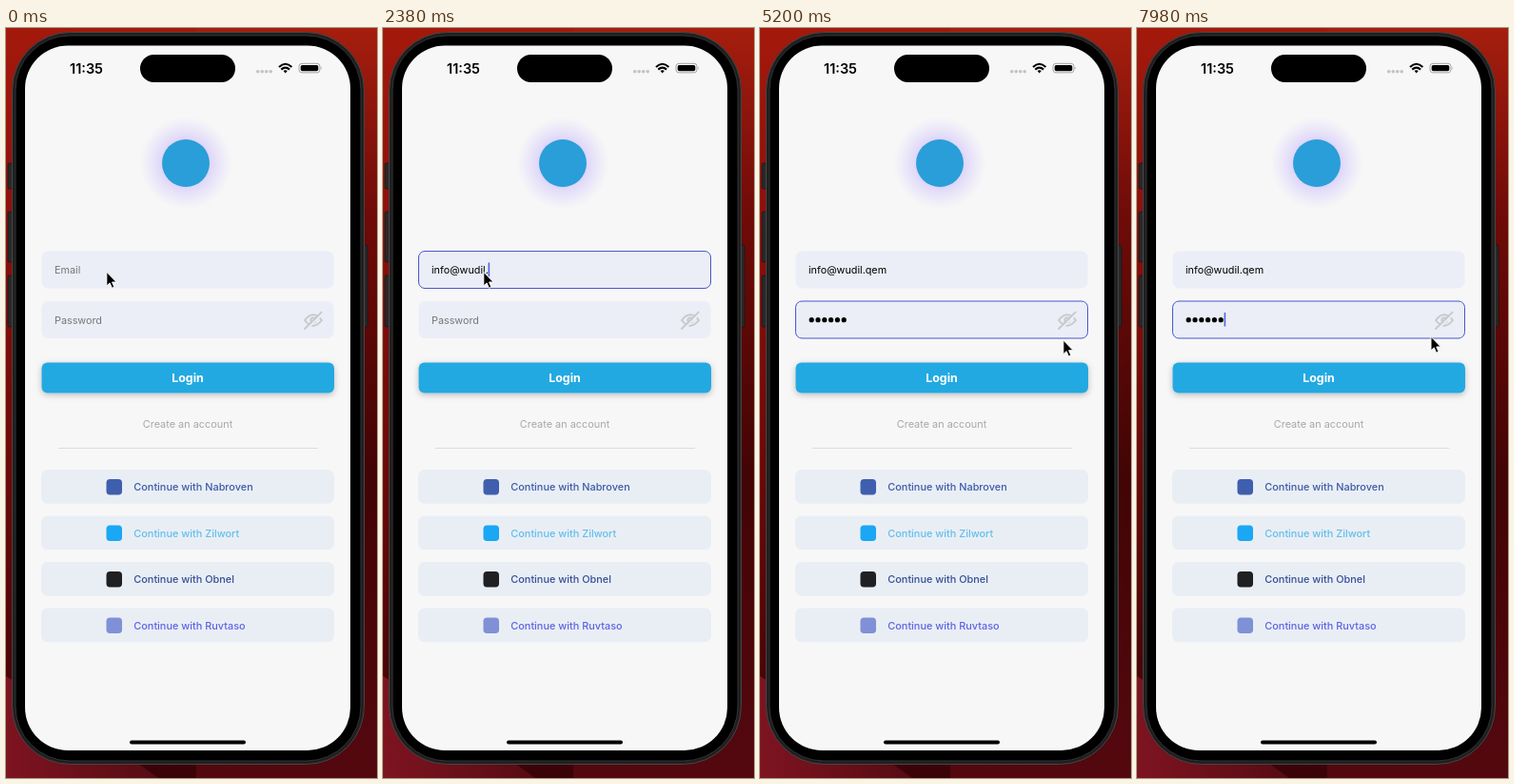
An HTML page that plays this animation: 390x788 px, repeating every 8000 ms.

```html
<!DOCTYPE html>
<html lang="en">
<head>
<meta charset="utf-8">
<title>Login screen</title>
<style>
  html, body { margin: 0; width: 100%; height: 100%; overflow: hidden; background: #300; }
  svg { display: block; width: 390px; height: 788px; font: 10.8px Inter, sans-serif; }
  .field { fill: #ebeef6; stroke: none; }
  .field.focus { stroke: #4b55cf; }
  .hint { fill: #77777b; }
  .hint.focus { fill: #4850c4; }
</style>
</head>
<body>
<svg viewBox="0 0 390 788">
  <defs>
    <linearGradient id="wall" x2="0" y2="1">
      <stop stop-color="#a3190c"/><stop offset=".3" stop-color="#8a0e0a"/>
      <stop offset=".65" stop-color="#650808"/><stop offset="1" stop-color="#3a0307"/>
    </linearGradient>
    <linearGradient id="wallRight" x2="0" y2="1">
      <stop stop-color="#a51e0e"/><stop offset=".25" stop-color="#6f0b08"/>
      <stop offset=".6" stop-color="#420405"/><stop offset="1" stop-color="#54080f"/>
    </linearGradient>
    <linearGradient id="wave"><stop stop-color="#7d1420"/><stop offset="1" stop-color="#560b14"/></linearGradient>
    <radialGradient id="glow">
      <stop stop-color="#9a7bff" stop-opacity=".5"/><stop offset=".5" stop-color="#a58cff" stop-opacity=".32"/>
      <stop offset="1" stop-color="#b9a6ff" stop-opacity="0"/>
    </radialGradient>
    <filter id="shadow" x="-10%" y="-40%" width="120%" height="200%">
      <feDropShadow dx="0" dy="2" stdDeviation="3" flood-opacity=".25"/>
    </filter>
  </defs>

  <rect width="390" height="788" fill="url(#wall)"/>
  <rect x="200" width="190" height="788" fill="url(#wallRight)"/>
  <path d="M0 681Q80 730 160 788H0Z" fill="url(#wave)"/>

  <g fill="#29292a" stroke="#111" stroke-width=".6">
    <rect x="2" y="142" width="6" height="27" rx="1.5"/>
    <rect x="2" y="193" width="6" height="53" rx="1.5"/>
    <rect x="2" y="260" width="6" height="54" rx="1.5"/>
    <rect x="374" y="228" width="6" height="86" rx="1.5"/>
  </g>
  <rect x="6.5" y="4.5" width="370" height="769" rx="61" fill="#1f1f20" stroke="#464647"/>
  <rect x="10" y="8" width="363" height="762" rx="57" stroke="#333"/>
  <rect x="20" y="18.5" width="342" height="740.5" rx="45" fill="#f7f7f7"/>
  <rect x="141" y="28" width="100" height="29" rx="14.5"/>
  <rect x="130" y="748.5" width="122" height="4" rx="2"/>

  <text x="84.5" y="47.5" text-anchor="middle" font-size="14.5" font-weight="600">11:35</text>
  <g fill="#c3c3c5">
    <circle cx="264.7" cy="45.7" r="1.8"/><circle cx="269.2" cy="45.7" r="1.8"/>
    <circle cx="273.7" cy="45.7" r="1.8"/><circle cx="278.2" cy="45.7" r="1.8"/>
  </g>
  <g fill="none" stroke="#000" stroke-width="2.1">
    <path d="M287 41Q293.7 34.5 300.4 41M289.3 43.6Q293.7 39.6 298.1 43.6"/>
    <path d="M291.6 45L293.7 47.6L295.8 45Q293.7 43.4 291.6 45Z" fill="#000" stroke="none"/>
  </g>
  <rect x="308" y="37.3" width="22" height="9.6" rx="3" fill="none" stroke="#a5a5a7"/>
  <rect x="309.7" y="39" width="18.6" height="6.2" rx="1.7"/>
  <path d="M331.3 40.4Q333 42 331.3 43.8Z" fill="#a5a5a7"/>

  <circle cx="189" cy="142" r="49" fill="url(#glow)"/>
  <circle cx="189" cy="142" r="25" fill="#2a9ed8"/>

  <rect id="emailBox" class="field" x="37.5" y="234.5" width="307" height="39" rx="6.5"/>
  <rect id="passBox" class="field" x="37.5" y="287" width="307" height="39" rx="6.5"/>
  <text id="email" x="51" y="258"></text>
  <text id="pass" x="51" y="310.5"></text>
  <g id="dots"></g>
  <rect id="caret" width="1.6" height="14.5" fill="#4a68dd"/>
  <g id="eye" fill="none" stroke="#c8c9cc" stroke-width="1.9">
    <path d="M314 307Q323 295.5 332 307Q323 318.5 314 307Z"/>
    <circle cx="323" cy="307" r="2.6"/>
    <g id="slash" stroke-linecap="round">
      <path d="M315.4 317.2L333 300" stroke="#ebeef6"/>
      <path d="M314 316L331.6 298.6"/>
    </g>
  </g>

  <rect x="37.5" y="351.5" width="307.5" height="32" rx="6" fill="#24a9e1" filter="url(#shadow)"/>
  <text x="191" y="372" text-anchor="middle" font-size="12.4" font-weight="700" fill="#fff">Login</text>
  <text x="191" y="419.5" text-anchor="middle" font-size="10.9" fill="#a8a8ab">Create an account</text>
  <path d="M55 441.5H328" stroke="#dcdcde"/>
  <g id="social" font-size="10.9" font-weight="500"></g>

  <path id="pointer" d="M0 0V14.6L3.3 11.6L5.6 17L8.1 15.9L5.8 10.7H10.4Z" stroke="#fff" stroke-width="1" stroke-linejoin="round"/>
</svg>
<script>
const LOOP = 8000;
const $ = id => document.getElementById(id);
const EMAIL = 'info@wudil.qem', PASSWORD = '123456';
const emailKeys = [1000, 1080, 1170, 1270, 1440, 1700, 1840, 1960, 2080, 2200, 2340, 2520, 2630, 2750];
const passKeys = [...PASSWORD].map((_, i) => 3670 + i * 72);
const EMAIL_FOCUS = 880, PASS_FOCUS = 3000;

const easeIn = u => u * u, easeOut = u => u * (2 - u), easeBoth = u => u * u * (3 - 2 * u);
// time, x, y, easing used to arrive there
const path = [
  [4200, 105.8, 256.3], [4580, 286.2, 314.5, easeIn], [4780, 318, 344, easeOut],
  [4960, 317, 335, easeBoth], [5020, 317, 335, easeBoth], [5500, 322.8, 313.3, easeBoth],
  [7620, 322.8, 313.3, easeBoth], [7980, 309, 324.3, easeBoth]
];

$('social').innerHTML = [
  ['Nabroven', '#3f5fae', '#3b5aa6'], ['Zilwort', '#1aa7f3', '#60bfea'],
  ['Obnel', '#202022', '#344e96'], ['Ruvtaso', '#7f90d6', '#5c64e2']
].map(([name, icon, ink], i) => `<g transform="translate(0 ${464 + i * 48.5})">
  <rect x="37" width="308" height="35.7" rx="6.5" fill="#e9eef5"/>
  <rect x="105.5" y="10" width="16.5" height="16.5" rx="3.8" fill="${icon}"/>
  <text x="134.3" y="22" fill="${ink}">Continue with ${name}</text></g>`).join('');

$('dots').innerHTML = passKeys.map((_, i) => `<circle cx="${54.2 + i * 6.8}" cy="306.7" r="2.6"/>`).join('');

const clamp = u => Math.min(1, Math.max(0, u));
const ramp = (t, a, b) => clamp((t - a) / (b - a));
const countBefore = (keys, t) => keys.filter(k => k <= t).length;

function pointerAt(t) {
  const i = path.findIndex(k => k[0] > t);
  if (i === 0) return path[0].slice(1, 3);
  if (i < 0) return path.at(-1).slice(1, 3);
  const [a, b] = [path[i - 1], path[i]];
  const u = b[3](ramp(t, a[0], b[0]));
  return [1, 2].map(j => a[j] + (b[j] - a[j]) * u);
}

function setField(node, value, hint, focus) {
  node.textContent = value || hint;
  node.setAttribute('class', value ? '' : focus ? 'hint focus' : 'hint');
}

function caretAlpha(t) {
  if (t < EMAIL_FOCUS) return 0;
  if (t < 4180) return 1;
  const p = (t - 4180) % 830;
  return p < 200 ? 1 - ramp(p, 0, 100) : ramp(p, 260, 380);
}

function draw(t) {
  const inPass = t >= PASS_FOCUS, inEmail = t >= EMAIL_FOCUS && !inPass;
  const typed = EMAIL.slice(0, countBefore(emailKeys, t));
  const hidden = countBefore(passKeys, t);
  const shown = (t >= 5780 && t < 6020) || (t >= 7020 && t < 7520);

  $('emailBox').classList.toggle('focus', inEmail);
  $('passBox').classList.toggle('focus', inPass);
  setField($('email'), typed, 'Email', inEmail);
  setField($('pass'), shown ? PASSWORD : '', hidden ? '' : 'Password', inPass);
  [...$('dots').children].forEach((dot, i) => dot.setAttribute('opacity', +(!shown && i < hidden)));

  const width = inPass
    ? shown ? $('pass').getComputedTextLength() : hidden * 6.8
    : typed ? $('email').getComputedTextLength() : 0;
  $('caret').setAttribute('x', 50.8 + width);
  $('caret').setAttribute('y', inPass ? 299 : 246.5);
  $('caret').setAttribute('opacity', caretAlpha(t));

  const dim = ramp(t, 6000, 6100) * (1 - ramp(t, 6660, 6760));
  $('eye').setAttribute('opacity', 1 - dim * 0.5);
  $('slash').setAttribute('opacity', +!shown);
  $('pointer').setAttribute('transform', `translate(${pointerAt(t)})`);
}

function frame() {
  draw(performance.now() % LOOP);
  requestAnimationFrame(frame);
}
frame();
</script>
</body>
</html>
```
